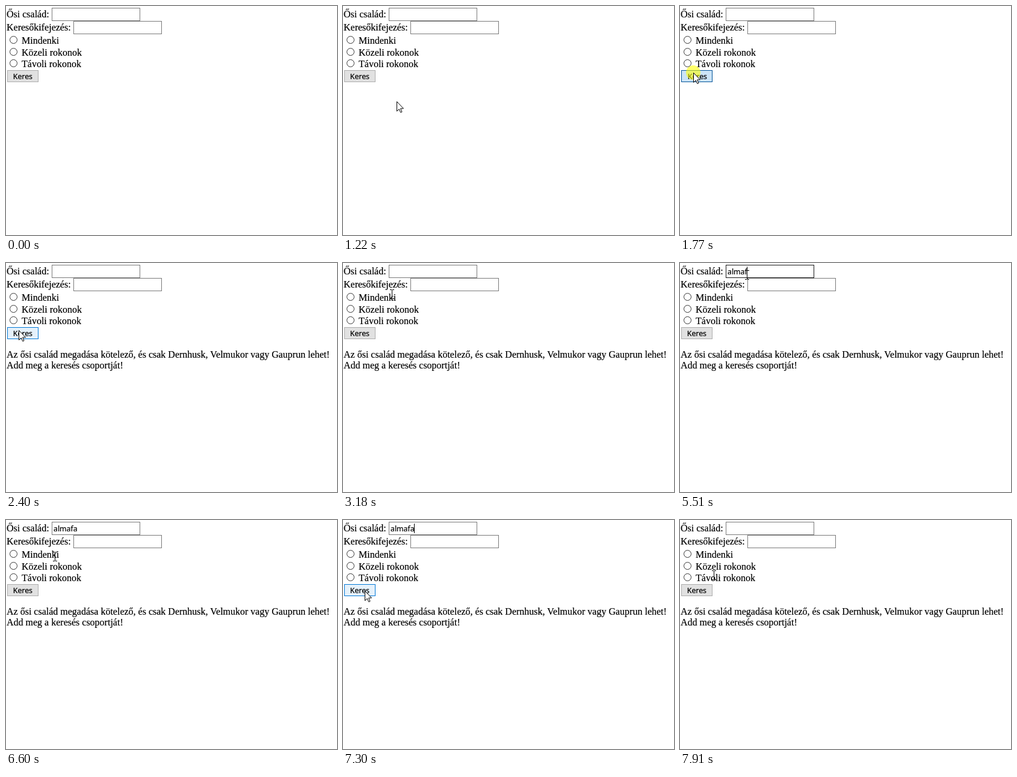
These frames come from a looping animation (550 by 382 pixels, 7990 ms). An HTML page:

```html
<!DOCTYPE html>
<html lang="hu">
<head>
<meta charset="utf-8">
<style>
html, body { margin: 0; width: 100%; height: 100%; overflow: hidden; background: #fff; }
svg { display: block; width: 550px; height: 382px; }
text { font: 16px "Liberation Serif", "Times New Roman", serif; stroke: #000; stroke-width: .2px; }
.ui { font: 12.3px "Noto Sans", "Open Sans", sans-serif; }
.box { fill: #fff; stroke: #7a7a7a; }
.radio { fill: #fff; stroke: #333; }
</style>
</head>
<body>
<svg viewBox="0 0 550 382">
  <text x="1" y="19">Ősi család:</text>
  <text x="1" y="41">Keresőkifejezés:</text>
  <rect id="field" class="box" x="76.5" y="3.5" width="146" height="21"/>
  <rect class="box" x="112.5" y="25.5" width="146" height="21"/>
  <text id="typed" class="ui" x="79" y="19"></text>
  <path id="caret" d="M.5 6V22" stroke="#000"/>
  <circle class="radio" cx="12.5" cy="56.5" r="6"/>
  <circle class="radio" cx="12.5" cy="76.5" r="6"/>
  <circle class="radio" cx="12.5" cy="95.5" r="6"/>
  <text x="26" y="63">Mindenki</text>
  <text x="26" y="83">Közeli rokonok</text>
  <text x="26" y="102">Távoli rokonok</text>
  <rect id="button" x="2.5" y="107.5" width="51" height="19"/>
  <text id="label" class="ui" y="122">Keres</text>
  <g id="errors">
    <text x="1" y="158">Az ősi család megadása kötelező, és csak Dernhusk, Velmukor vagy Gauprun lehet!</text>
    <text x="1" y="176">Add meg a keresés csoportját!</text>
  </g>
  <circle id="click" r="12" fill="#ff0" opacity=".58"/>
  <path id="arrow" d="M.5 .5V16.5L4.2 13L6.8 18.6L9 17.6L6.6 12H11.5Z" fill="#fff" stroke="#000"/>
  <path id="beam" d="M-3.5 -7.5H-.5M.5 -7.5H3.5M0 -7V7M-3.5 7.5H-.5M.5 7.5H3.5" fill="none" stroke="#000"/>
</svg>
<script>
const LOOP = 7990;
const STEP = 77; // the pointer is redrawn once per step
const $ = id => document.getElementById(id);
const [field, typed, caret, button, label, errors, click, arrow, beam] =
  ["field", "typed", "caret", "button", "label", "errors", "click", "arrow", "beam"].map($);

// Pointer moves; a higher power slows the end of the move
const moves = [
  { start: 300, end: 1070, a: [401, 370], b: [148, 200], power: 1 },
  { start: 1150, end: 1850, a: [118, 180], b: [22, 111], power: 3 },
  { start: 2400, end: 2700, a: [21, 112], b: [23, 114], power: 1 },
  { start: 2870, end: 3630, a: [27, 109], b: [111, 20], power: 2 },
  { start: 6430, end: 7150, a: [110, 23], b: [36, 118], power: 2 },
  { start: 7760, end: 7910, a: [43, 110], b: [56, 92], power: 1 }
];
const word = "almafa";
const keys = [5130, 5210, 5280, 5430, 5510, 5660];

const within = (t, a, b) => t >= a && t < b;
const show = (el, on) => el.setAttribute("visibility", on ? "visible" : "hidden");
const place = (el, x, y) => el.setAttribute("transform", `translate(${x} ${y})`);

function pointer(t) {
  const move = moves.filter(m => t >= m.start).pop();
  if (!move) return [-50, 400];
  const { start, end, a, b, power } = move;
  const steps = Math.round((end - start) / STEP);
  const step = Math.min(steps, Math.floor((t - start) / (end - start) * steps + .2));
  const k = 1 - (1 - step / steps) ** power;
  return a.map((v, i) => Math.round(v + (b[i] - v) * k));
}

function render(t) {
  const [x, y] = pointer(t);
  const overText = y < 107;
  show(arrow, !overText);
  show(beam, overText);
  place(arrow, x, y);
  place(beam, x + .5, y);

  const pressed = within(t, 1700, 1850) || within(t, 7380, 7530);
  const hover = within(x, 2, 54) && within(y, 107, 127);
  button.setAttribute("fill", pressed ? "#cce4f7" : hover ? "#e5f1fb" : "#e1e1e1");
  button.setAttribute("stroke", pressed ? "#005499" : hover ? "#0078d7" : "#adadad");
  label.setAttribute("x", pressed ? 12.8 : 11.8);

  const tapping = within(t, 4660, 4730);
  const overField = within(x, 76, 223) && within(y, 3, 25);
  field.style.stroke = overField && !tapping ? "#171717" : "#7a7a7a";
  show(click, pressed || tapping);
  place(click, x, y);

  const count = t < 7530 ? keys.filter(k => t >= k).length : 0;
  typed.textContent = word.slice(0, count);
  show(caret, within(t, 4660, 6200) || within(t, 6730, 7380));
  place(caret, 79 + (count ? Math.floor(typed.getComputedTextLength()) : 0), 0);
  show(errors, t >= 1850);
}

function tick() {
  render(performance.now() % LOOP);
  requestAnimationFrame(tick);
}
tick();
</script>
</body>
</html>
```
